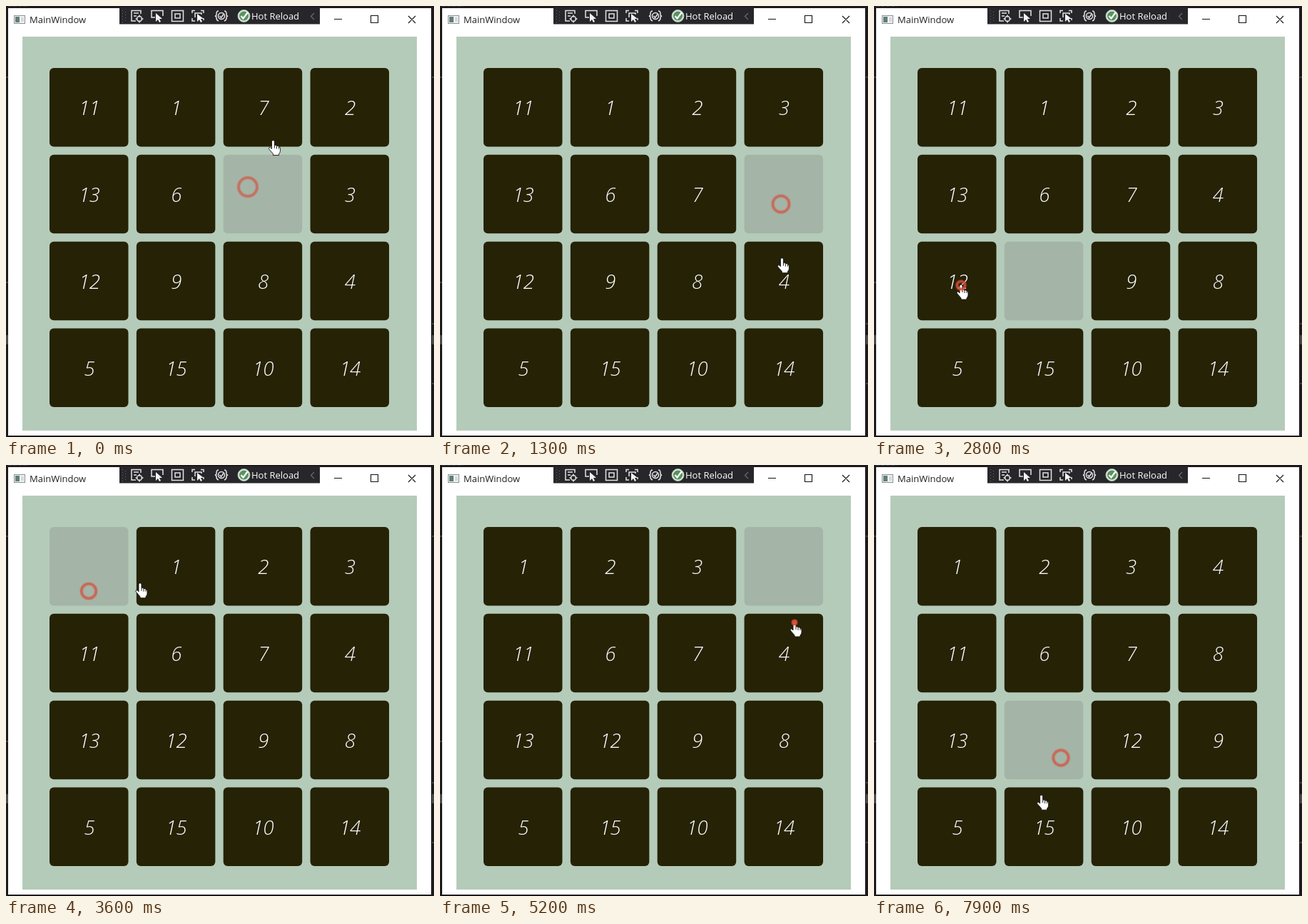
Write an HTML page that moves like this. It is 600x605 px and loops after 8000 ms.

```html
<!DOCTYPE html>
<html lang="en">
<head>
<meta charset="utf-8">
<title>Sliding puzzle</title>
<style>
  html, body { margin: 0; width: 100%; height: 100%; overflow: hidden; background: #1d1a1d; }
  svg { display: block; width: 600px; height: 605px; }
  text { font-family: "Open Sans", "Noto Sans", sans-serif; }
  .num { font-size: 28px; font-weight: 350; font-style: italic; letter-spacing: -.03em; fill: #fff; text-anchor: middle; }
  .line { fill: none; stroke: #e4e4e4; stroke-width: 1.5; }
</style>
</head>
<body>
<svg viewBox="0 0 600 605">
  <!-- desktop behind the window -->
  <rect width="600" height="605" fill="#1d1a1d"/>
  <path d="M3 0H32" stroke="#5a5758" stroke-dasharray="5 2"/>
  <path d="M0 100h3M597 100h3M0 388h3M597 446h3M597 530h3" stroke="#45413f" stroke-width="2"/>
  <path d="M0 462h3v13h-3zM597 462h3v13h-3z" fill="#4c494b"/>

  <!-- window -->
  <path d="M3 3H596V603H3Z" fill="#fff"/>
  <rect x="11.5" y="13.5" width="15" height="11" fill="#f2f2f2" stroke="#8a8f93"/>
  <rect x="13" y="15" width="6" height="8" fill="#5f7f78"/>
  <path d="M21 16h4v6h-4z" fill="#d5d9dc"/>
  <text x="33" y="24" font-size="13" fill="#222">MainWindow</text>
  <path d="M460 18.5h11M511.5 13.5h10v10h-10zM564 14l10 10M574 14l-10 10" fill="none" stroke="#111" stroke-width="1.1"/>

  <!-- debug toolbar -->
  <rect x="159" y="2" width="281" height="23.5" fill="#27272b"/>
  <path d="M163.5 6v17M167.5 8v15" stroke="#66666b" stroke-dasharray="1 3"/>
  <g class="line">
    <path d="M189 11V6.500H176V21h6M179 10h7M179 14h4"/>
    <circle cx="187" cy="18" r="3.500"/><path d="M187 12.500v3M187 20.500v3M181.500 18h3M189.500 18h3"/>
    <path d="M209 16h-5V6.500h16V14"/>
    <path d="M232.500 6.500h16v15h-16zM237 11h7v6h-7z"/>
    <path d="M261 10V6.500h4M273 6.500h4V10M261 17v4h4M265 16v-6h9v2M277 17v3"/>
    <path d="M298 7q-3 0-3 4t-2 3q2 0 2 3t3 4M306 7q3 0 3 4t2 3q-2 0-2 3t-3 4"/>
    <circle cx="302" cy="14" r="4.500"/>
    <path d="M299.500 14l2 2.500 3.500-5"/>
  </g>
  <path d="M210 10v12l3-3 2 4 2-1-2-4h4zM268 11v11l3-3 2 4 2-1-2-4h4z" fill="#f4f4f4"/>
  <circle cx="333.500" cy="14" r="8.500" fill="#dfe9df" stroke="#a9c1a9"/>
  <circle cx="333.500" cy="14" r="6.500" fill="#5a9161"/>
  <path d="M329.500 14l3 3.500 6-8" fill="none" stroke="#fff" stroke-width="2.200"/>
  <text x="344" y="19" font-size="13" fill="#fff">Hot Reload</text>
  <path d="M432 10l-4.500 4.500 4.500 4.500" fill="none" stroke="#68686d" stroke-width="1.300"/>

  <!-- board -->
  <rect x="23" y="43" width="553" height="553" fill="#b5cbb9"/>
  <g id="board"></g>
  <g id="hand" stroke="#111" stroke-width=".9">
    <path d="M-2 1Q-2-1 0-1T2 1V6Q4 5 5 7Q7 6 8 8Q10 8 10 10V14Q10 16 8 18V20H0V18L-6 11Q-6 8-4 9L-2 11Z" fill="#fff"/>
    <path d="M2 6v4M5 7v4M8 8v3"/>
  </g>
  <g id="ring" fill="none" stroke="#d84a38">
    <circle stroke-width="6" opacity=".25"/>
    <circle stroke-width="3.500"/>
  </g>
</svg>
<script>
const LOOP = 8000, STEP = 100, HOLD = 130, SLIDE_AT = 150, RING_LIFE = 350;
const LEFT = 61, TOP = 87, PITCH = 121.85;
const start = [11, 1, 7, 2, 13, 6, 0, 3, 12, 9, 8, 4, 5, 15, 10, 14];

// evenly spaced presses along a straight line
const line = (n, t0, x0, y0, t1, x1, y1) => Array.from({ length: n }, (_, i) => {
  const mix = (a, b) => a + (b - a) * i / (n - 1);
  return { t: mix(t0, t1), x: mix(x0, x1), y: mix(y0, y1) };
});
const presses = [
  ...line(2, -285, 339, 254, 230, 388, 165),
  ...line(3, 600, 476, 167, 1500, 480, 389),
  ...line(3, 1970, 370, 394, 2690, 122, 392),
  ...line(2, 3040, 115, 275, 3380, 116, 177),
  ...line(3, 3800, 235, 160, 4650, 478, 160),
  ...line(2, 5170, 497, 221, 6800, 483, 405),
  ...line(2, 7200, 365, 402, 7670, 262, 411),
  { t: 8030, x: 226, y: 481 }
];
// one idle round of the board
const sweep = { from: 5350, to: 6680, x: 348, y: 307, rx: 157, ry: 195, a0: -0.42, a1: 0.53 - 2 * Math.PI };

const $ = id => document.getElementById(id);
const place = (el, x, y) => el.setAttribute("transform", `translate(${x} ${y})`);
const placeCell = (el, i) => place(el, LEFT + PITCH * (i % 4), TOP + PITCH * (i >> 2));
const cellAt = ({ x, y }) => Math.floor((x - LEFT + 6) / PITCH) + 4 * Math.floor((y - TOP + 6) / PITCH);

const tiles = start.map((_, n) => {
  const g = document.createElementNS("http://www.w3.org/2000/svg", "g");
  g.innerHTML = `<rect width="110.500" height="110.500" rx="6" fill="${n ? "#252206" : "#a4b5a8"}"/>` +
    (n ? `<text class="num" x="55.500" y="66.400">${n}</text>` : "");
  $("board").append(g);
  return g;
});

// each press swaps the tile under it with the gap
function boardAt(t) {
  const cells = [...start];
  for (const p of presses) {
    if (t < p.t + SLIDE_AT) break;
    const gap = cells.indexOf(0), from = cellAt(p);
    [cells[gap], cells[from]] = [cells[from], cells[gap]];
  }
  return cells;
}

function pointerAt(t) {
  if (t > sweep.from && t < sweep.to) {
    const a = sweep.a0 + (sweep.a1 - sweep.a0) * (t - sweep.from) / (sweep.to - sweep.from);
    return [sweep.x + sweep.rx * Math.cos(a), sweep.y + sweep.ry * Math.sin(a)];
  }
  const i = presses.findIndex(p => p.t > t), a = presses[i - 1], b = presses[i];
  const u = Math.max(0, (t - a.t - HOLD) / (b.t - a.t - HOLD));
  const e = 1 - (1 - u) ** 2.5;
  return [a.x + (b.x - a.x) * e, a.y + (b.y - a.y) * e];
}

function draw(t) {
  boardAt(t).forEach((n, i) => placeCell(tiles[n], i));
  place($("hand"), ...pointerAt(t));

  const hit = presses.find(p => t >= p.t && t < p.t + RING_LIFE);
  const ring = $("ring");
  ring.style.display = hit ? "" : "none";
  if (!hit) return;
  const age = t - hit.t;
  place(ring, hit.x, hit.y);
  ring.setAttribute("opacity", 1 - age / 750);
  for (const c of ring.children) c.setAttribute("r", 1 + 0.042 * age);
}

const began = performance.now();
function tick() {
  const t = (performance.now() - began) % LOOP;
  draw(Math.floor(t / STEP) * STEP);
  requestAnimationFrame(tick);
}
tick();
</script>
</body>
</html>
```
